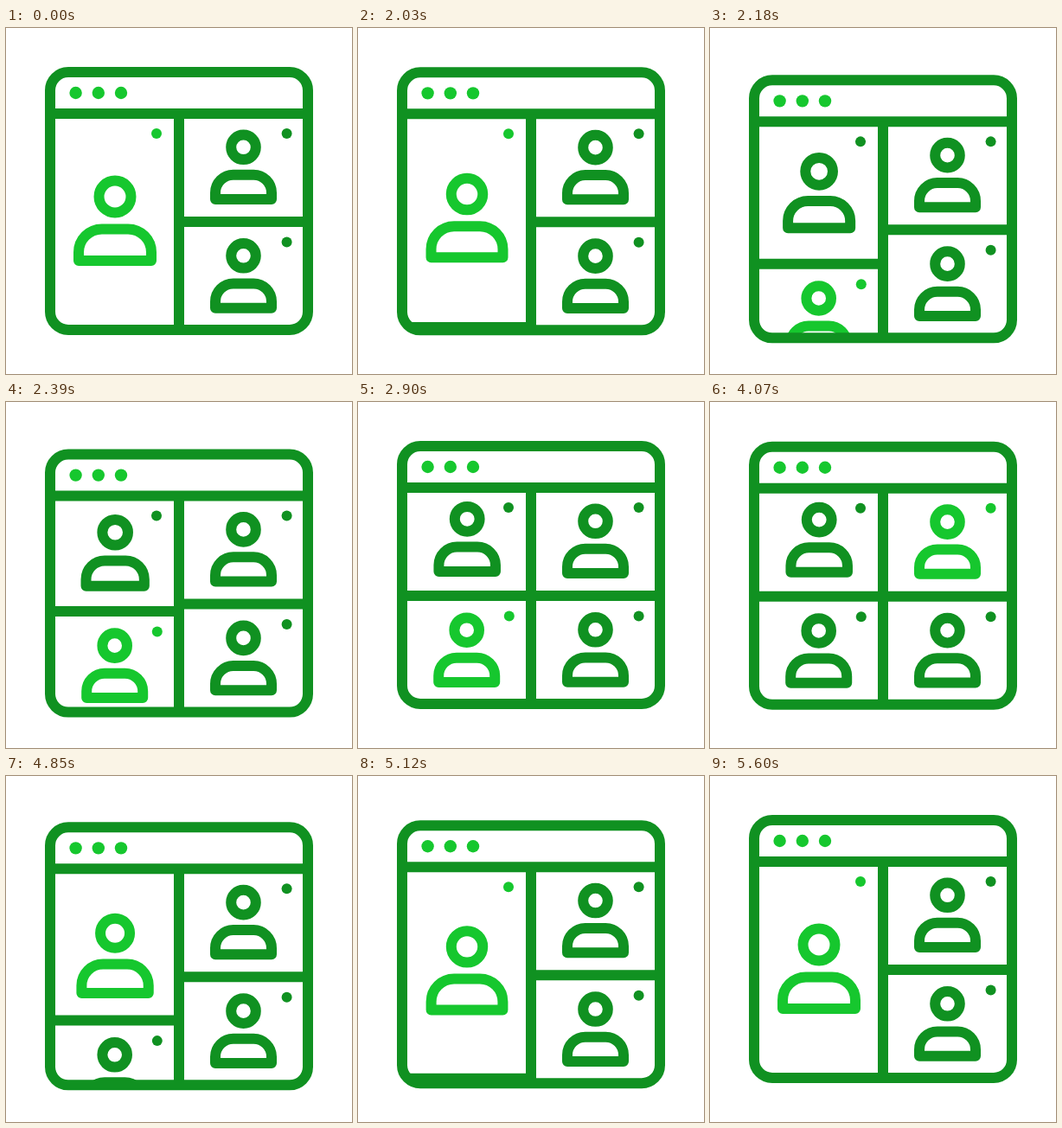
Recreate the animation shown at these times as an HTML page with a canvas. Size 400 px wide and 400 px high, loop 5630 ms.

```html
<!DOCTYPE html>
<html lang="en">
<head>
<meta charset="utf-8">
<title>Video call</title>
<style>
  html, body { margin: 0; width: 100%; height: 100%; overflow: hidden; background: #fff; }
  canvas { display: block; width: 100%; height: 100%; }
</style>
</head>
<body>
<canvas id="stage" width="400" height="400"></canvas>
<script>
const ctx = document.getElementById('stage').getContext('2d');
const LOOP = 5630;
const DARK = '#109121';
const LIGHT = '#16c72e';

const clamp = v => Math.min(1, Math.max(0, v));
const mix = (a, b, p) => a + (b - a) * p;
const smooth = u => u * u * (3 - 2 * u);

// Cubic bezier easing, solved by bisection.
function bezier(x1, y1, x2, y2) {
  const at = (a, b, s) => 3 * (1 - s) * (1 - s) * s * a + 3 * (1 - s) * s * s * b + s * s * s;
  return u => {
    if (u <= 0 || u >= 1) return clamp(u);
    let lo = 0, hi = 1;
    for (let i = 0; i < 24; i++) {
      const mid = (lo + hi) / 2;
      if (at(x1, x2, mid) < u) lo = mid; else hi = mid;
    }
    return at(y1, y2, lo);
  };
}
const settle = bezier(0.33, 0, 0, 1);
const snap = bezier(0.15, 0.1, 0, 1);

const progress = (t, start, length, ease) => ease(clamp((t - start) / length));

// Drop down by `depth`, then ease back up.
function bounce(t, start, depth, down, up, ease) {
  return depth * (progress(t, start, down, smooth) - progress(t, start + down, up, ease));
}

function line(x1, y1, x2, y2) {
  ctx.beginPath();
  ctx.moveTo(x1, y1);
  ctx.lineTo(x2, y2);
  ctx.stroke();
}

function dot(x, y, r, color) {
  ctx.fillStyle = color;
  ctx.beginPath();
  ctx.arc(x, y, r, 0, 7);
  ctx.fill();
}

function roundedBox(x, y, size, r) {
  ctx.beginPath();
  ctx.roundRect(x, y, size, size, r);
}

// Head and shoulders; `half` is half the shoulder width.
function person(x, headY, baseY, half, color) {
  const top = baseY - half * 0.87;
  const r = half * 0.64;
  ctx.strokeStyle = color;
  ctx.beginPath();
  ctx.arc(x, headY, half * 0.44, 0, 7);
  ctx.stroke();
  ctx.beginPath();
  ctx.moveTo(x - half, baseY);
  ctx.arcTo(x - half, top, x, top, r);
  ctx.arcTo(x + half, top, x + half, baseY, r);
  ctx.lineTo(x + half, baseY);
  ctx.closePath();
  ctx.stroke();
}

function speakerAt(t) {
  if (t < 2120 || t >= 4790) return 'main';
  return t < 3710 ? 'guest' : 'right';
}

function draw(t) {
  const speaker = speakerAt(t);
  const tint = name => name === speaker ? LIGHT : DARK;
  const hidden = (from, to) => t >= from && t < to;

  const shift = bounce(t, 2005, 13, 270, 630, settle)
    + bounce(t, 3600, 4, 220, 350, smooth)
    + bounce(t, 4690, 13, 270, 630, settle);
  const large = 1 - progress(t, 2002, 750, snap) + progress(t, 4675, 750, snap);
  const slide = 131 * (1 - progress(t, 2002, 650, snap) + progress(t, 4690, 750, settle));

  ctx.fillStyle = '#fff';
  ctx.fillRect(0, 0, 400, 400);
  ctx.save();
  ctx.translate(0, shift);
  ctx.lineWidth = 12;
  ctx.lineJoin = 'round';

  ctx.save();
  roundedBox(51, 51, 298, 21);
  ctx.clip();

  person(mix(126.2, 126, large), mix(135.3, 195, large), mix(196, 269, large),
    mix(32.75, 42, large), tint('main'));
  if (!hidden(4790, 5000)) dot(174, 122, 6, tint('main'));

  person(125.7, 263.7 + slide, 324 + slide, 32.5, tint('guest'));
  if (!hidden(3140, 3320)) dot(174.8, 247.5 + slide, 6, tint('guest'));

  person(274.5, 137.8, 198, 32.5, tint('right'));
  if (!hidden(4310, 4520)) dot(324.6, 122, 6, tint('right'));

  person(274.5, 263.3, 323.7, 32.5, DARK);
  dot(324.6, 247.4, 6, DARK);

  ctx.strokeStyle = DARK;
  line(51, 224 + slide, 200, 224 + slide);
  line(200, 224, 349, 224);
  ctx.restore();

  ctx.strokeStyle = DARK;
  line(51, 99, 349, 99);
  line(200, 99, 200, 349);
  roundedBox(51, 51, 298, 21);
  ctx.stroke();

  for (const x of [80.6, 106.8, 133]) dot(x, 75, 7.2, LIGHT);
  ctx.restore();
}

const start = performance.now();
function frame() {
  draw((performance.now() - start) % LOOP);
  requestAnimationFrame(frame);
}
frame();
</script>
</body>
</html>
```
